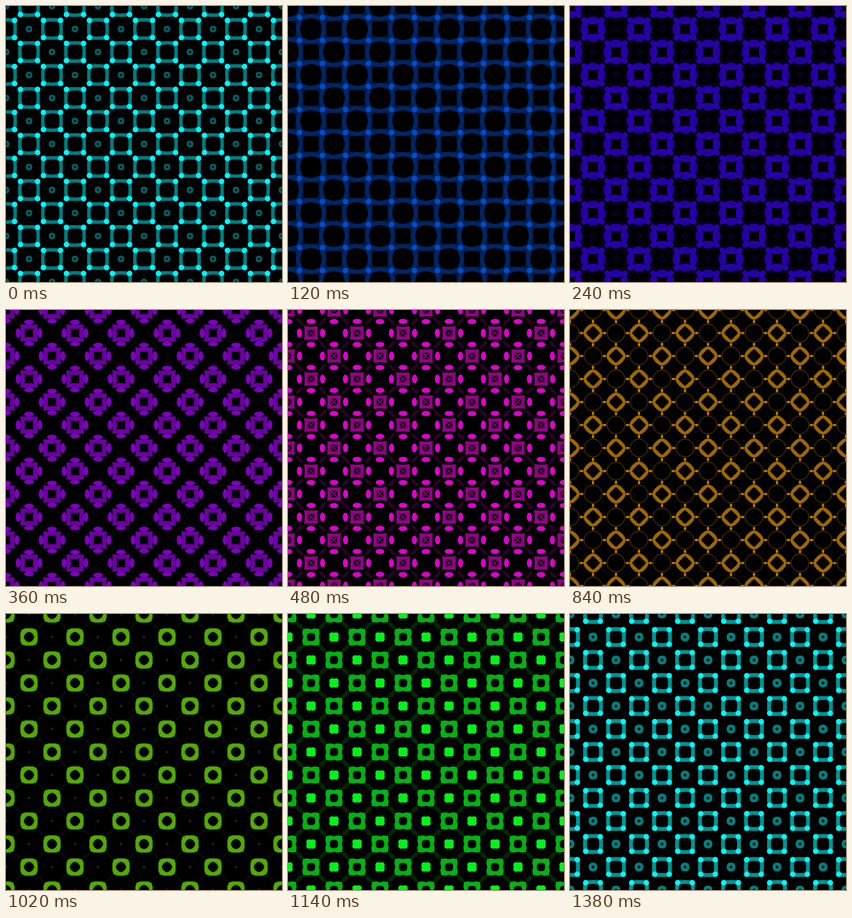
An HTML page with a canvas for the animation above (1440 ms loop, 500 px wide and 500 px high).

```html
<!DOCTYPE html>
<html>
<head>
<meta charset="utf-8">
<style>
html, body { margin: 0; height: 100%; overflow: hidden; background: #000; }
canvas { display: block; }
</style>
</head>
<body>
<canvas id="stage" width="500" height="500"></canvas>
<script>
const ctx = document.getElementById('stage').getContext('2d');
const LOOP = 1440, STEP = 60, CELL = 500 / 12;
const EVEN = 0, ODD = 1;

// Linear interpolation over rows of [time, ...values]; null outside the rows.
function sample(keys, t) {
  if (t < keys[0][0]) t += LOOP;
  for (let i = 1; i < keys.length; i++) {
    const a = keys[i - 1], b = keys[i];
    if (t >= a[0] && t <= b[0]) {
      const k = (t - a[0]) / (b[0] - a[0]);
      return a.slice(1).map((v, j) => v + (b[j + 1] - v) * k);
    }
  }
  return null;
}

const hueKeys = [[0, 181], [240, 254], [480, 305], [600, 340], [840, 399], [1140, 486], [1380, 539], [1440, 541]];

// Closed outline from radii at 0, 22.5 and 45 degrees, mirrored all round.
function outline(path, radii, dir) {
  for (let i = 0; i < 16; i++) {
    const r = radii[[0, 1, 2, 1][i % 4]], a = dir * i * Math.PI / 8;
    path.lineTo(r * Math.cos(a), r * Math.sin(a));
  }
  path.closePath();
}

function ringPath(v) {
  const path = new Path2D(), hole = new Path2D();
  outline(path, v.slice(0, 3), 1);
  outline(hole, v.slice(3), -1);
  path.addPath(hole);
  return path;
}

function dotsPath([dist, along, across], turn) {
  const path = new Path2D();
  for (let i = 0; i < 4; i++) {
    const a = turn + i * Math.PI / 2, x = dist * Math.cos(a), y = dist * Math.sin(a);
    path.moveTo(x + along * Math.cos(a), y + along * Math.sin(a));
    path.ellipse(x, y, along, across, a, 0, 2 * Math.PI);
  }
  return path;
}

function tile(unit, parity) {
  const all = new Path2D();
  for (let i = -1; i <= 13; i++)
    for (let j = -1; j <= 13; j++)
      if (((i + j) & 1) === parity) all.addPath(unit, new DOMMatrix([1, 0, 0, 1, i * CELL, j * CELL]));
  return all;
}

// Ring rows: time, tone, outer radii x3, inner radii x3.
const ring = (parity, keys) => ({ parity, keys, unit: ringPath });
// Dot rows: time, tone, distance, radius along and across the spoke.
const axisDots = (parity, keys) => ({ parity, keys, unit: v => dotsPath(v, 0) });
const diagonalDots = (parity, keys) => ({ parity, keys, unit: v => dotsPath(v, Math.PI / 4) });

const layers = [
  // faint links between cells
  diagonalDots(EVEN, [[360, 0, 29.5, 6, 3], [480, .18, 29.5, 9, 3], [600, .27, 29.5, 10, 2.5], [780, 0, 29.5, 10, 2]]),
  diagonalDots(EVEN, [[960, 0, 29.5, 6, 2], [1140, .15, 29.5, 9, 4], [1260, 0, 29.5, 6, 2]]),

  // square frame growing out of the odd cells
  ring(ODD, [
    [1020, .2, 2, 2.2, 2.8, 0, 0, 0],
    [1140, .95, 8, 8.4, 10.2, 0, 0, 0],
    [1380, .58, 18, 19.3, 23.5, 11, 11.7, 14.5],
    [1440, .5, 19.7, 21.2, 25.5, 13.5, 14.4, 17],
    [1680, .09, 19, 20.5, 26, 15, 16.2, 21],
    [1740, 0, 19, 20.5, 26, 16, 17, 22]]),
  ring(ODD, [[180, 0, 7, 5.3, 5, 4, 3.1, 2.8], [240, .2, 7, 5.3, 5, 4, 3.1, 2.8], [300, 0, 7, 5.3, 5, 4, 3.1, 2.8]]),
  ring(ODD, [[540, 0, 4, 3.1, 2.8, 0, 0, 0], [600, .4, 4, 3.1, 2.8, 0, 0, 0], [720, 0, 4, 3.1, 2.8, 0, 0, 0]]),
  ring(ODD, [[720, 0, 20, 19, 18, 18, 17, 17], [840, .2, 18, 17.5, 17, 15, 15, 15], [960, 0, 16, 16, 16, 14, 14, 14]]),

  // two rings closing in on the even cells
  ring(EVEN, [
    [120, .4, 27, 27, 29, 20, 20, 22],
    [240, .68, 21.5, 20, 27, 9, 9.5, 15],
    [480, .58, 11.5, 12.7, 17.5, 6, 6.3, 8],
    [600, .5, 6, 7, 9.5, 2, 2.3, 2.8],
    [720, 0, 4, 4, 5, 0, 0, 0]]),
  ring(EVEN, [
    [480, 0, 24, 23.5, 23, 19, 18, 18],
    [600, .88, 22, 21.5, 21.5, 13, 13, 14],
    [840, .62, 18, 16.7, 16, 12.5, 10.3, 9.3],
    [1140, .7, 14, 17, 20.5, 7.5, 8, 8.5],
    [1380, .5, 8, 8.2, 8.5, 2.5, 2.5, 2.5],
    [1440, .38, 6, 6.2, 6.5, 2, 2, 2],
    [1560, 0, 3, 3, 3, 0, 0, 0]]),

  // bright dots: out along the diagonals, then round to the axes
  diagonalDots(ODD, [[1080, .9, 2, 4, 4], [1140, .95, 5, 5, 5], [1380, .98, 18.7, 5, 5], [1440, .98, 22, 5, 5], [1560, .8, 29.5, 5, 5]]),
  diagonalDots(EVEN, [[120, .8, 29.5, 5, 5], [240, .68, 23, 5, 5], [300, 0, 21, 4, 4]]),
  axisDots(EVEN, [
    [180, 0, 19, 3, 8],
    [240, .62, 18.5, 4, 9.5],
    [480, .88, 21, 4.7, 8],
    [600, .9, 18, 4, 9],
    [840, .75, 21, 3, 2.2],
    [960, 0, 21, 2, 2]]),
  diagonalDots(EVEN, [[420, 0, 4, 5, 1], [480, .5, 4, 5, 1], [540, 0, 4, 5, 1]])
];

function draw(t) {
  const hue = sample(hueKeys, t)[0];
  ctx.fillStyle = '#000';
  ctx.fillRect(0, 0, 500, 500);
  for (const { parity, keys, unit } of layers) {
    const values = sample(keys, t);
    if (!values || values[0] <= 0) continue;
    const [tone, ...shape] = values;
    ctx.fillStyle = `hsl(${hue}, 100%, ${tone * 50}%)`;
    ctx.fill(tile(unit(shape), parity));
  }
}

const start = performance.now();
let shown = -1;
function tick() {
  const t = Math.floor((performance.now() - start) % LOOP / STEP) * STEP;
  if (t !== shown) draw(shown = t);
  requestAnimationFrame(tick);
}
tick();
</script>
</body>
</html>
```
